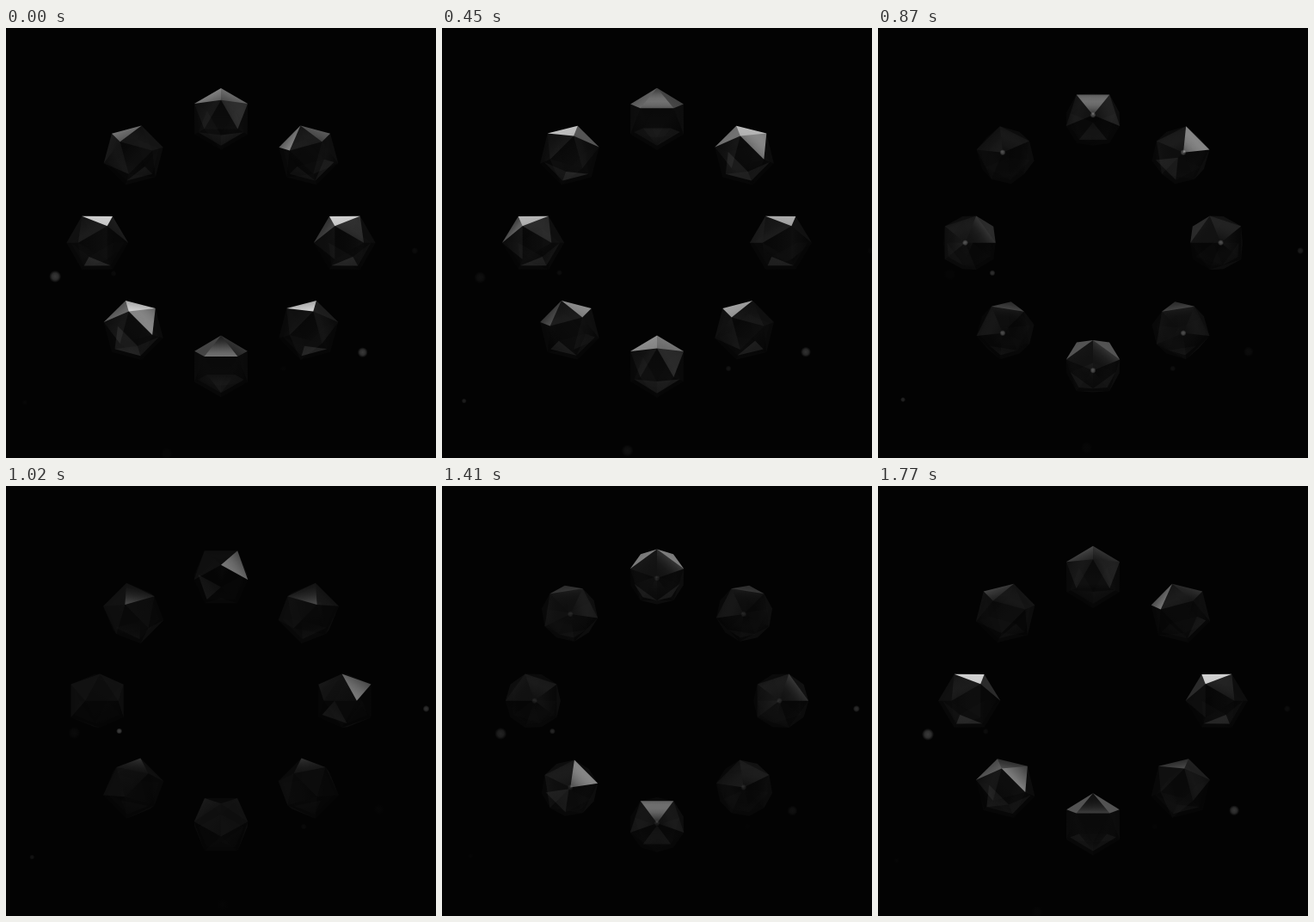
Recreate the animation shown at these times as an HTML page with a canvas. Size 500x500 px, loop 1.8 s.

```html
<!DOCTYPE html>
<html lang="en">
<head>
<meta charset="utf-8">
<title>Crystal ring</title>
<style>
html, body { margin: 0; width: 100%; height: 100%; overflow: hidden; background: #030303; }
canvas { display: block; }
</style>
</head>
<body>
<canvas id="stage" width="500" height="500"></canvas>
<script>
const ctx = document.getElementById('stage').getContext('2d');
const LOOP = 1800, DEPTH = 1800, RING = 143.8, UNIT = 19.1;
const CX = 250, CY = 249.7, RAD = Math.PI / 180, PHI = (1 + Math.sqrt(5)) / 2;

const dot = (a, b) => a[0] * b[0] + a[1] * b[1] + a[2] * b[2];
const norm = a => { const l = Math.hypot(...a); return a.map(c => c / l); };
const bell = x => Math.exp(-x * x);
const angle = c => Math.acos(Math.max(-1, Math.min(1, c))) / RAD;
const gray = v => { const c = Math.round(Math.max(0, Math.min(250, v))); return `rgb(${c},${c},${c})`; };

// Icosahedron: the first axis is tangent to the ring, the second points outwards
const verts = [], faces = [];
for (const a of [-1, 1]) for (const b of [-PHI, PHI])
  verts.push([0, a, b], [a, b, 0], [b, 0, a]);
const near = (i, j) => Math.hypot(...verts[i].map((c, k) => c - verts[j][k])) < 2.1;
for (let i = 0; i < 12; i++) for (let j = i + 1; j < 12; j++) for (let k = j + 1; k < 12; k++)
  if (near(i, j) && near(j, k) && near(i, k))
    faces.push({ ids: [i, j, k], n: norm(verts[i].map((c, m) => c + verts[j][m] + verts[k][m])) });

// Side lights: azimuth from straight up, angle from the viewer, width, strength
const lights = [[45, 88, 14, 135], [0, 85, 8, 110]].map(([az, a, w, power]) => ({
  dir: [Math.sin(a * RAD) * Math.sin(az * RAD), -Math.sin(a * RAD) * Math.cos(az * RAD), Math.cos(a * RAD)],
  w, power
}));

function reflected(n, view) {
  const d = 2 * dot(n, view);
  return n.map((c, i) => d * c - view[i]);
}

// Panels on the wall behind the crystals, at x and y on that wall
function wall(x, y) {
  const main = 235 * bell((y - 0.73) / (y < 0.73 ? 0.13 : 0.38)) * bell(x / (x < 0 ? 0.5 : 0.42));
  const pair = 130 * bell((y - 0.47) / 0.12) * bell((Math.abs(x) - 0.3) / 0.14);
  const left = 150 * bell((x + 0.68) / 0.17) * bell((y - 0.55) / 0.14);
  return main + pair + left;
}

function room(r) {
  let v = 8 + 7 * Math.max(0, -r[1]) + 4 * Math.sin(5 * r[0] + 3 * r[1]) + 10 * bell((angle(r[2]) - 78) / 7);
  if (r[1] > 0.3) v *= 0.5;
  if (r[2] < -0.3) v += wall(-r[0] / r[2], r[1] / r[2]);
  for (const l of lights)
    v += l.power * bell(angle(dot(r, l.dir)) / l.w);
  return v;
}

// Shade runs along the slope of the face, with the normal slightly bent
function fillFace(pts, n, view, gain) {
  const len = Math.hypot(n[0], n[1]) || 1, ux = n[0] / len, uy = n[1] / len;
  const mx = (pts[0][0] + pts[1][0] + pts[2][0]) / 3, my = (pts[0][1] + pts[1][1] + pts[2][1]) / 3;
  const ds = pts.map(p => (p[0] - mx) * ux + (p[1] - my) * uy);
  const lo = Math.min(...ds) - 0.1, hi = Math.max(...ds) + 0.1;
  const grad = ctx.createLinearGradient(mx + ux * lo, my + uy * lo, mx + ux * hi, my + uy * hi);
  for (let i = 0; i <= 6; i++) {
    const bend = (lo + (hi - lo) * i / 6) * 0.006;
    const m = norm([n[0] + ux * bend, n[1] + uy * bend, n[2]]);
    grad.addColorStop(i / 6, gray(room(reflected(m, view)) * gain));
  }
  ctx.fillStyle = grad;
  ctx.beginPath();
  pts.forEach(p => ctx.lineTo(p[0], p[1]));
  ctx.fill();
}

function glow(x, y, r, v) {
  const g = ctx.createRadialGradient(x, y, 0, x, y, r);
  g.addColorStop(0, gray(v));
  g.addColorStop(0.55, gray(v * 0.75));
  g.addColorStop(1, '#000');
  ctx.fillStyle = g;
  ctx.fillRect(x - r, y - r, 2 * r, 2 * r);
}

function crystal(turn, roll) {
  const s = Math.sin(turn), c = Math.cos(turn), sr = Math.sin(roll), cr = Math.cos(roll);
  const ox = RING * s, oy = -RING * c;
  const view = norm([-ox, -oy, DEPTH]);
  const place = ([x, y, z]) => {
    const out = y * cr - z * sr;
    return [x * c + out * s, x * s - out * c, y * sr + z * cr];
  };
  const project = (p, size) => {
    const k = DEPTH / (DEPTH - p[2] * size);
    return [CX + (ox + p[0] * size) * k, CY + (oy + p[1] * size) * k];
  };
  const pos = verts.map(place);
  const back = [], front = [];
  for (const f of faces) {
    const n = place(f.n);
    (dot(n, view) > 0.018 ? front : back).push({ ids: f.ids, n });
  }
  for (const f of back)
    fillFace(f.ids.map(i => project(pos[i], UNIT * 0.86)), f.n.map(c => -c), view, 0.12);
  for (const f of front)
    fillFace(f.ids.map(i => project(pos[i], UNIT)), f.n, view, 0.85);
  // Sparkle on a corner that faces the viewer
  for (const p of pos) {
    const tilt = angle(p[2] / 1.902);
    if (tilt < 16) {
      const [x, y] = project(p, UNIT);
      glow(x, y, 3.5, 80 * bell(tilt / 6));
    }
  }
}

// Dust: x, y, speed x and y per second, radius, peak time, duration, brightness
const dust = [
  [60, 288.7, -28.5, 2.5, 7, 1700, 320, 58],
  [418.4, 377, 18.5, -1, 6, 200, 300, 80],
  [485.5, 259, -17, 0, 4, 1200, 260, 70],
  [131, 285, -8.5, 0.6, 3.5, 1100, 350, 65],
  [27.5, 432.8, 8, -3.7, 3, 680, 220, 60],
  [337, 396, 23, 0, 3.5, 620, 250, 25],
  [215, 491.5, 64, -8, 7, 440, 260, 14]
];

function draw(now) {
  const t = Math.floor((now % LOOP) / 30) * 30;
  ctx.globalCompositeOperation = 'source-over';
  ctx.fillStyle = '#030303';
  ctx.fillRect(0, 0, 500, 500);
  ctx.globalCompositeOperation = 'lighter';
  for (const [x, y, vx, vy, r, peak, span, power] of dust) {
    const d = ((t - peak + 4500) % LOOP) - 900;
    const fade = (1 - (d / 900) ** 4) / (1 + (d / span) ** 2);
    glow(x + vx * d / 1000, y + vy * d / 1000, r, power * fade);
  }
  const roll = (116 - t * 180 / LOOP) * RAD;
  for (let i = 0; i < 8; i++) crystal(i * Math.PI / 4, roll);
}

const start = performance.now();
function tick() {
  draw(performance.now() - start);
  requestAnimationFrame(tick);
}
tick();
</script>
</body>
</html>
```
